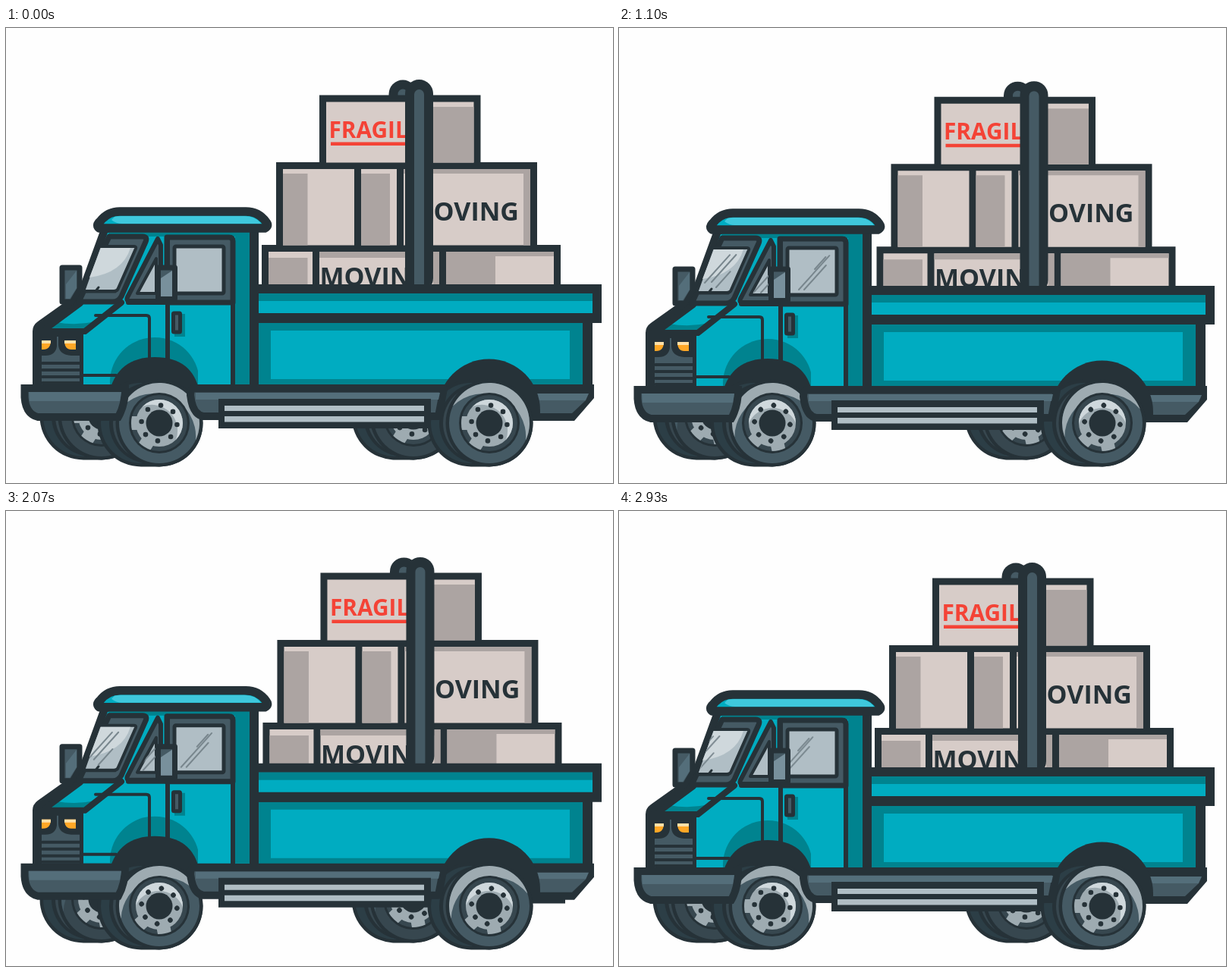
Recreate the animation shown at these times as an HTML page. Size 800x600 px, loop 3030 ms.

```html
<!DOCTYPE html>
<html lang="en">
<head>
<meta charset="utf-8">
<title>Moving truck</title>
<style>
html, body { margin: 0; width: 100%; height: 100%; overflow: hidden; background: #fefefe; }
svg { display: block; width: 100vw; height: 100vh; }
text { font-family: "Open Sans", "Noto Sans", sans-serif; font-weight: 700; }
.k { fill: #263238; } .t { fill: #00acc1; } .d { fill: #00838f; }
.s { fill: #455a64; } .m { fill: #546e7a; } .g { fill: #b0bec5; }
.b { fill: #d7ccc8; } .h { fill: #aca4a2; }
.o { stroke: #263238; stroke-linejoin: round; stroke-linecap: round; }
.n { fill: none; }
.glare { stroke: #78868d; stroke-width: 2; stroke-linecap: round; }
</style>
</head>
<body>
<svg viewBox="0 0 800 600">
  <defs>
    <clipPath id="door"><path d="M224 290H285V348H224Z"/></clipPath>
    <clipPath id="vent"><path d="M197 306V349H175Z"/></clipPath>
    <clipPath id="shield"><path d="M123 290H169L145 345H106Z"/></clipPath>
  </defs>

  <path class="k" d="M690 495H737V517.500H690Z"/>
  <g id="farWheels"></g>

  <g id="load">
    <path class="o n" stroke-width="37" d="M523 87V330"/>
    <path stroke="#455a64" stroke-width="13" stroke-linecap="round" d="M523 87V330"/>

    <path class="k" d="M413 88.500H625.500V186H413ZM356 177H700V292H356ZM337 286H731V352H337Z"/>
    <path class="b" d="M422 97.500H616.500V177.500H422Z"/>
    <path class="h" d="M555 104H616.500V177.500H555Z"/>
    <text x="425.500" y="145" font-size="29.800" fill="#f44336">FRAGILE</text>
    <path fill="#f44336" d="M428 150.500H540V155H428Z"/>

    <path class="b" d="M365 186H459V286.500H365ZM468 186H515V286.500H468ZM524 186H691V286.500H524Z"/>
    <path class="h" d="M365 192H397.500V286.500H365ZM468 192H506V286.500H468ZM524 186H691V286.500H682V192H524Z"/>
    <text x="531.500" y="254" font-size="34" fill="#263238">MOVING</text>

    <path class="b" d="M346 295H404V350H346ZM413 295H571V350H413ZM580 295H722V350H580Z"/>
    <path class="h" d="M346 303H397.500V350H346ZM413 295H571V303H413ZM563 295H571V350H563ZM580 295H722V301H645V350H580Z"/>
    <text x="413.500" y="340" font-size="34" fill="#263238">MOVING</text>

    <path class="o n" stroke-width="37" d="M544.500 86.500V330"/>
    <path stroke="#455a64" stroke-width="13" stroke-linecap="round" d="M544.500 87.500V340"/>
  </g>

  <g class="body">
    <!-- cargo bed -->
    <path class="k" d="M322 376H773V481H322Z"/>
    <path class="d" d="M333 389H760V470H333Z"/>
    <path class="t" d="M349 399H743V463H349Z"/>
    <path class="k" d="M327 338H785V389H327Z"/>
    <path class="t" d="M333 350H773V376H333Z"/>
    <path class="d" d="M333 350H773V360H333Z"/>
    <path class="k" d="M690 470H775V488L749 518H690Z"/>
    <path class="m" d="M697 482H768L764 491H697Z"/>
    <path class="s" d="M697 491H764L746 508H697Z"/>

    <!-- cab -->
    <path class="k" d="M126 262H333V480H35V400Q35 392 42 387L94 350Z"/>
    <path class="t" d="M134 270H321V470H100V402L58 398L100 365Z"/>
    <path class="d" d="M302 270H321V470H302ZM136 268H321V275H134Z"/>
    <path class="d" d="M55 398L100 365H150L106 398Z"/>
    <path class="t" d="M66 388L98 365H148L118 387Q92 393 66 388Z"/>
    <path class="d" d="M137 470A59 59 0 0 1 253 452V470Z"/>
    <path class="o n" stroke-width="8" d="M48 400L98 363M44 400H104L152 362"/>
    <path class="o n" stroke-width="4" d="M118 379H185Q189 379 189 383V437M102 458H145"/>

    <!-- windows -->
    <path class="s o" stroke-width="7" d="M136 275H180Q187 275 184 282L152 354Q148 361 141 361H96Z"/>
    <path class="g o" stroke-width="4" d="M123 288H169Q172 288 171 291L148 343Q147 347 142 347H102Z"/>
    <path fill="#cfd8dc" d="M125 290H164Q154 323 110 329Z"/>
    <path class="o n" stroke-width="3" d="M104 348H144M118 347L122 342"/>
    <path class="s o" stroke-width="6" d="M200 278L204 286V360H163Q158 360 160 355Z"/>
    <path class="g o" stroke-width="4" d="M198 304V350H173Z"/>
    <path class="s o" stroke-width="7" d="M212 276H294Q299 276 299 281V362H212Z"/>
    <rect class="g o" stroke-width="5" x="222" y="288" width="65" height="62" rx="2"/>
    <g clip-path="url(#door)"><g class="glare" id="g0"></g></g>
    <g clip-path="url(#vent)"><g class="glare" id="g1"></g></g>
    <g clip-path="url(#shield)"><g class="glare" id="g2"></g></g>
    <path class="o n" stroke-width="6" d="M161 362H299M213 276V445M299 282V472"/>

    <!-- handle and mirrors -->
    <path class="d" d="M222 377H236V407H222Z"/>
    <rect class="s o" stroke-width="5" x="220.500" y="376" width="9" height="25" rx="1"/>
    <path class="s o" stroke-width="7" d="M200.500 316H222.500V357H200.500Z"/>
    <path fill="#78909c" d="M204 330L219 320V354H204Z"/>
    <path class="s o" stroke-width="7" d="M74 316H97V344L87 361H74Z"/>
    <path class="m" d="M79 338L93 320V343L84 357H79Z"/>

    <!-- roof -->
    <path class="t o" stroke-width="11.500" d="M123 264Q118 260 124 255Q134 242 150 242H316Q333 242 343 256Q347 261 341 264Z"/>
    <path fill="#3fc8dc" d="M143 249Q147 248 152 248H314Q329 248 336 258H153Q145 258 139 253Z"/>

    <!-- nose -->
    <path class="k" d="M35 401H102V475H35Z"/>
    <path class="s" d="M47 407H97V470H47Z"/>
    <path class="k" d="M44 404H67V420Q65 432 52 432H44ZM69 404H98V432H86Q70 431 69 418Z"/>
    <path fill="#ffa726" d="M47 412H59Q59 424 49 424H47ZM77 412H92V424H86Q77 424 77 412Z"/>
    <path fill="#ffe0a8" d="M47 412H59V416H47ZM77 412H92V416H77Z"/>
    <path class="o n" stroke-width="4" d="M48 442H98M48 451H98M48 460H98M48 468H98"/>

    <!-- wheel arches -->
    <path class="k" d="M136 480Q148 434 196 434Q246 434 255 480V514H136Z"/>
    <path class="k" d="M569 514V504A67.500 67.500 0 0 1 704 504V514Z"/>
  </g>

  <g id="nearWheels"></g>

  <g class="body">
    <!-- bumper -->
    <path class="s o" stroke-width="10" style="stroke-linejoin:miter" d="M24.500 475H157Q157 497 148 513H42Q26 509 24.500 487Z"/>
    <path class="m" d="M30 480H152L150 492H31Z"/>
    <!-- sill and step -->
    <path class="s o" stroke-width="10" d="M246 475.500H577L570 512H260Q246 510 243 484Q243 478 246 475.500Z"/>
    <path class="m" d="M250 481H572L570 490H250Z"/>
    <path class="k" d="M280 489H560V528H280Z"/>
    <path class="g" d="M288 498H551V505H288ZM288 512H551V519.500H288Z"/>
  </g>
</svg>
<script>
const LOOP = 3030, LAST = 2930, TURNS = 3;
const $ = id => document.getElementById(id);

// Step index and start time pairs; steps between them are even.
const anchors = [[0, 0], [7, 650], [13, 1190], [20, 1800], [26, 2330], [33, LAST]];
const starts = [];
for (let a = 1; a < anchors.length; a++) {
  const [i0, t0] = anchors[a - 1], [i1, t1] = anchors[a];
  for (let i = i0; i < i1; i++) {
    starts.push(Math.round((t0 + (t1 - t0) * (i - i0) / (i1 - i0)) / 10) * 10);
  }
}
starts.push(LAST);

// [time, value] keys, eased between neighbours
const bodyY = [[0, 0], [90, -1], [300, -7], [500, -2], [650, .4], [880, 0], [1100, 2], [1450, .4],
  [1800, -.6], [2200, -6.8], [2330, -5.8], [2600, -1], [2760, .6], [LAST, 0]];
const loadY = [[0, 0], [90, -1], [300, -10], [500, -3], [650, .5], [880, 0], [1100, 2.2], [1450, .5],
  [1800, -.6], [2220, -9.8], [2330, -8.6], [2600, -2], [2760, .8], [LAST, 0]];
const loadX = [[0, 0], [300, 3], [650, .6], [1100, 2.5], [1450, .8], [1800, -.4], [2330, 3.2], [2700, .8], [LAST, 0]];
const glareX = [[0, 28], [600, 22], [1100, 0], [1400, -40], [1450, 30], [1800, 2], [2330, -14], [LAST, -22]];
const glareA = [[0, 0], [580, 0], [650, .3], [900, 1], [1150, 1], [1400, 0], [1520, 0], [1750, 1], [LAST, .9]];

function at(keys, t) {
  const i = keys.findIndex(k => k[0] > t);
  if (i < 0) return keys[keys.length - 1][1];
  const [t0, v0] = keys[i - 1], [t1, v1] = keys[i];
  const u = (t - t0) / (t1 - t0);
  return v0 + (v1 - v0) * u * u * (3 - 2 * u);
}

const disc = (r, fill, x = 0) => `<circle cx="${x}" r="${r}" fill="${fill}"/>`;

// Crescent turned to angle a, edge radius r and inner arc radius q
const crescent = (a, r, q, fill) => `<path fill="${fill}" transform="rotate(${a})"
  d="M0 ${-r}A${r} ${r} 0 0 1 0 ${r}A${q} ${q} 0 0 0 0 ${-r}Z"/>`;

function wheel(x, y, side, shine) {
  let bolts = '';
  for (let i = 0; i < 8; i++) {
    const a = (5 + i * 45) * Math.PI / 180;
    bolts += `<circle cx="${23.5 * Math.cos(a)}" cy="${23.5 * Math.sin(a)}" r="3.3" fill="#263238"/>`;
  }
  const glint = a => `<path fill="#9eabb1" transform="rotate(${a})" d="M28 -9L36 -9Q38 0 36 9L28 9Z"/>`;
  return `<g transform="translate(${x} ${y})">
    <path fill="#263238" d="M0 -57.500A57.500 57.500 0 0 1 0 57.500H-24A57.500 57.500 0 0 1 -24 -57.500Z"/>
    ${disc(53, '#2c3e46', -24)}${disc(53, '#263238', -13)}${disc(51, '#37474f', -10)}
    ${disc(57.5, '#263238')}${disc(53, side)}
    <g class="spin">
      ${crescent(-65, 53, 56.5, shine)}
      ${disc(40, '#263238')}${disc(37, '#37474f')}
      ${glint(122)}${glint(180)}
      ${disc(31, '#9eabb1')}
      ${crescent(-45, 31, 34, '#cfd8dc')}
      ${bolts}
    </g>
    ${disc(17.5, '#263238')}
  </g>`;
}

$('farWheels').innerHTML = [126, 537].map(x => wheel(x, 512, '#37474f', '#455a64')).join('');
$('nearWheels').innerHTML = [202, 637].map(x => wheel(x, 521, '#455a64', '#9eabb1')).join('');

const streak = (x, y, len) => `<path d="M${x} ${y}l${len * .72} ${-len * .8}"/>`;
$('g0').innerHTML = streak(237, 343, 56) + streak(244, 343, 40) + streak(258, 316, 20);
$('g1').innerHTML = streak(178, 346, 34) + streak(187, 347, 28);
$('g2').innerHTML = streak(113, 334, 46) + streak(122, 333, 45) + streak(128, 340, 26);

const glares = document.querySelectorAll('.glare');
const bodies = document.querySelectorAll('.body');
const spins = document.querySelectorAll('.spin');
const all = (list, name, value) => list.forEach(el => el.setAttribute(name, value));

function draw(ms) {
  const now = ms % LOOP;
  let t = 0;
  for (const s of starts) if (s <= now) t = s;
  all(bodies, 'transform', `translate(0 ${at(bodyY, t)})`);
  $('load').setAttribute('transform', `translate(${at(loadX, t)} ${at(loadY, t)})`);
  all(spins, 'transform', `rotate(${-360 * TURNS * t / LAST})`);
  all(glares, 'transform', `translate(${at(glareX, t)} 0)`);
  all(glares, 'opacity', at(glareA, t));
}

const begin = performance.now();
function tick() {
  draw(performance.now() - begin);
  requestAnimationFrame(tick);
}
tick();
</script>
</body>
</html>
```
